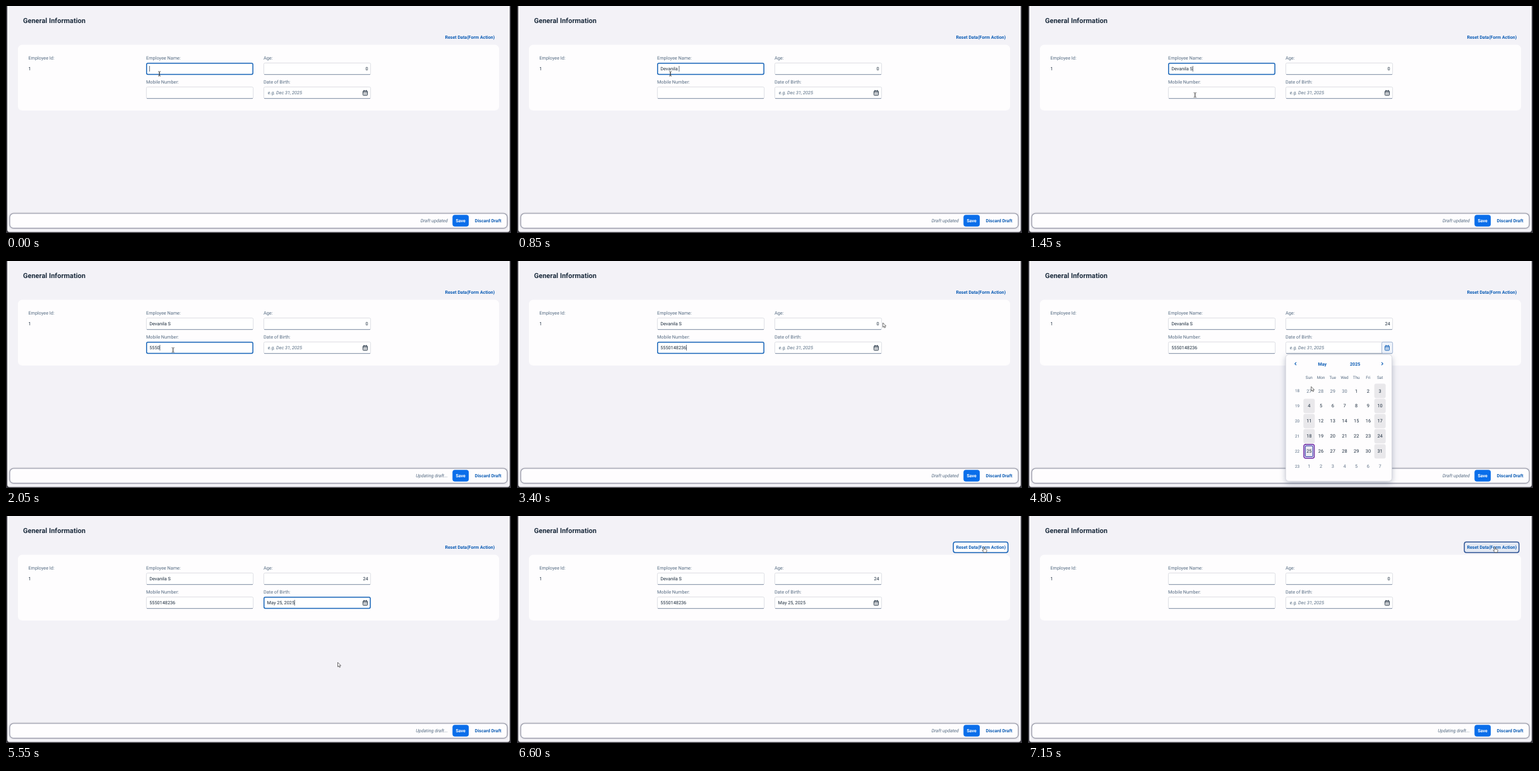
Recreate the animation shown at these times as an HTML page. Size 800 by 360 pixels, loop 7200 ms.

```html
<!DOCTYPE html>
<html lang="en">
<head>
<meta charset="utf-8">
<title>Employee form</title>
<style>
  html, body { margin: 0; width: 100%; height: 100%; overflow: hidden; background: #39383e; }
  svg { display: block; width: 100vw; height: 100vh; }
  text { font: 7.3px Roboto, "Open Sans", sans-serif; fill: #1d2d3e; white-space: pre; text-rendering: geometricPrecision; }
  .label { fill: #556b82; }
  .title { font-size: 11px; font-weight: 700; }
  .link { font-size: 7.1px; font-weight: 700; fill: #0b5cb5; }
  .hint { font-style: italic; fill: #556b82; }
  .mid { text-anchor: middle; }
  .end { text-anchor: end; }
  .small { font-size: 6.4px; fill: #556b82; }
  .day { font-size: 7.4px; }
  .out { fill: #66788c; }
</style>
</head>
<body>
<svg id="stage" viewBox="0 0 800 360" xmlns="http://www.w3.org/2000/svg"></svg>
<script>
const LOOP = 7200;
const NAME = "Devanila S";
const PHONE = "5550148236";
const BLUE = "#0b5cb5";
const stage = document.getElementById("stage");

function add(tag, attrs, parent = stage) {
  const el = document.createElementNS("http://www.w3.org/2000/svg", tag);
  for (const k in attrs) el.setAttribute(k, attrs[k]);
  parent.appendChild(el);
  return el;
}
function rect(x, y, width, height, rx, attrs, parent) {
  return add("rect", { x, y, width, height, rx, ...attrs }, parent);
}
function text(x, y, str, cls = "", parent) {
  const el = add("text", { x, y, class: cls }, parent);
  el.textContent = str;
  return el;
}
function path(d, attrs, parent) {
  return add("path", { d, fill: "none", ...attrs }, parent);
}
function show(el, on) { el.style.display = on ? "" : "none"; }
function put(el, str) { if (el.textContent !== str) el.textContent = str; }
const within = (v, a, b) => v >= a && v < b;

function field(x, y) {
  const plain = add("g", {});
  rect(x + .4, y + .4, 169.2, 18.4, 2, { fill: "#fff", stroke: "#d5d7de", "stroke-width": .8 }, plain);
  path(`M${x + 1} ${y + 18.6}h168`, { stroke: "#7d8ba3", "stroke-width": .9 }, plain);
  const ring = rect(x + .7, y + .7, 168.4, 17.8, 2.2, { fill: "#fff", stroke: "#1764b8", "stroke-width": 1.5 });
  return on => { show(plain, !on); show(ring, on); };
}

// Page
rect(2, -10, 796, 368.5, 4, { fill: "#f3f2f7" });
text(27, 27.4, "General Information", "title");
const button = rect(691.2, 41.3, 86.6, 16.6, 3.2, {});
text(695.5, 52.1, "Reset Data(Form Action)", "link");
rect(19, 61.5, 762, 104.2, 6.5, { fill: "#fefdfe" });

[[35.4, 85, "Employee Id:"], [222, 85, "Employee Name:"], [408, 85, "Age:"],
 [222, 123, "Mobile Number:"], [408, 123, "Date of Birth:"]]
  .forEach(([x, y, s]) => text(x, y, s, "label"));
text(35.4, 102.4, "1");

const focus = {
  name: field(222, 90), age: field(408, 90),
  phone: field(222, 128), date: field(408, 128)
};
const nameText = text(227.2, 102.4, "");
const phoneText = text(227.2, 140.2, "");
const ageText = text(573.6, 102.4, "0", "end");
const dateHint = text(414.8, 140.2, "e.g. Dec 31, 2025", "hint");
const dateText = text(413.6, 140.2, "May 25, 2025");
const iconBox = rect(560.4, 128.6, 17.2, 18, 2, { fill: "#eff3fa", stroke: "#8fa9cf", "stroke-width": .8 });
const icon = add("g", {});
rect(565.5, 134.6, 7, 7.2, 1, { fill: "none", "stroke-width": .9 }, icon);
path("M565.5 136.2h7M567.2 133.2v2M570.8 133.2v2", { "stroke-width": 1.1 }, icon);
path("M566.8 138.3h4.6M566.8 140.1h4.6", { "stroke-width": .9, "stroke-dasharray": "1 .8" }, icon);
const caret = path("", { stroke: "#1d2d3e", "stroke-width": .7 });

// Footer
rect(6, 329, 788, 23.4, 6, { fill: "#fefdfe", stroke: "#9698a9", "stroke-width": 1.1,
  style: "filter:drop-shadow(0 .5px 1.2px #5556)" });
const status = text(699.8, 343, "", "hint end");
rect(707.3, 331.2, 25.8, 18.6, 4, { fill: "#0a6eea" });
text(720.2, 343, "Save", "link mid").style.fill = "#fff";
text(742.8, 343, "Discard Draft", "link");

// Calendar
const cal = add("g", {});
rect(408.2, 148.4, 168.3, 200.8, 5, { fill: "#fefdfe", stroke: "#c9ccd6", "stroke-width": .6,
  style: "filter:drop-shadow(0 3px 5px #2235584d)" }, cal);
path("M425 160.7l-2.2 2.2 2.2 2.2M560 160.7l2.2 2.2-2.2 2.2", { stroke: BLUE, "stroke-width": 1.1 }, cal);
text(466.3, 165.6, "May", "link mid", cal);
text(518.2, 165.6, "2025", "link mid", cal);
"Sun Mon Tue Wed Thu Fri Sat".split(" ")
  .forEach((d, i) => text(445.3 + i * 18.72, 187.4, d, "small mid", cal));
for (let row = 0; row < 6; row++) {
  const y = 206 + row * 23.95;
  text(426.6, y + 2.2, 18 + row, "small mid", cal);
  for (let col = 0; col < 7; col++) {
    const n = row * 7 + col - 3;
    const inside = n >= 1 && n <= 31;
    const x = 445.3 + col * 18.72;
    if (inside && col % 6 === 0)
      rect(x - 9, y - 11.4, 18, 22.8, 3, { fill: "#e9e8eb" }, cal);
    if (n === 25) {
      rect(x - 8.2, y - 11, 16.4, 22, 3, { fill: "#fff", stroke: "#8a2fc4", "stroke-width": 1.5 }, cal);
      rect(x - 8.2, y - 11, 16.4, 22, 3, { fill: "none", stroke: "#24304f", "stroke-width": .8, "stroke-dasharray": "1 1" }, cal);
      rect(x - 6, y - 8.6, 12, 17.2, 1.5, { fill: "#ececf1", stroke: "#3c3fae", "stroke-width": 1.2 }, cal);
    }
    const label = n < 1 ? n + 30 : n > 31 ? n - 31 : n;
    text(x, y + 2.5, label, "day mid" + (inside ? "" : " out"), cal);
  }
}

// Pointers, each drawn around its hot spot
const pointers = { beam: add("g", {}), arrow: add("g", {}), hand: add("g", {}) };
path("M-2-3.5Q0-3.5 0-2.5V2.8Q0 3.8-2 3.8M2-3.5Q0-3.5 0-2.5V2.8Q0 3.8 2 3.8",
  { stroke: "#333", "stroke-width": .8 }, pointers.beam);
path("M0 0V7L1.6 5.6 2.7 8 4 7.4 2.9 5.1H5Z",
  { fill: "#fff", stroke: "#333", "stroke-width": .7, "stroke-linejoin": "round" }, pointers.arrow);
path("M-.8 0Q0-.9.8 0V3L4 3.7Q4.8 4 4.6 5L4 8.2H0L-2.5 5.2Q-2.4 4.2-.8 5Z",
  { fill: "#fff", stroke: "#333", "stroke-width": .7, "stroke-linejoin": "round" }, pointers.hand);

// time, x, y
const track = [
  [0, 243, 107.3], [1020, 243, 107.3], [1420, 264.6, 141], [2930, 264.6, 141],
  [3380, 579.6, 98], [3490, 579.6, 98], [3600, 558, 101], [4150, 558, 101],
  [4430, 569, 138], [4560, 569, 138], [4780, 448.6, 199.2], [4830, 448.6, 199.2],
  [5120, 446, 300], [5380, 446, 300], [5880, 739.6, 49.5], [LOOP, 739.6, 49.5]
];
function pointerAt(t) {
  let i = 1;
  while (i < track.length - 1 && t >= track[i][0]) i++;
  const [t0, x0, y0] = track[i - 1], [t1, x1, y1] = track[i];
  const p = (t - t0) / (t1 - t0), e = p * p * (3 - 2 * p);
  return [x0 + (x1 - x0) * e, y0 + (y1 - y0) * e];
}
function pointerKind(x, y, open) {
  if (x > 691 && within(y, 41, 58)) return "hand";
  const row = within(y, 90, 109) || within(y, 128, 147);
  if (!open && row && (within(x, 222, 391) || within(x, 408, y < 110 ? 578 : 560))) return "beam";
  return "arrow";
}

const RESET = 6850;
const saving = [[1550, 2300], [3650, 4150], [4550, 4750], [5450, 6050], [RESET, LOOP]];

function draw(t) {
  const cleared = t >= RESET;
  const open = within(t, 4600, 5400);
  const active = t < 1500 ? "name" : t < 3600 ? "phone" : t < 4500 ? "age" : within(t, 5400, 6550) ? "date" : "";
  for (const k in focus) focus[k](k === active);

  put(nameText, cleared ? "" : NAME.slice(0, Math.floor(t / 92)));
  put(phoneText, cleared || t < 1750 ? "" : PHONE.slice(0, 1 + Math.floor((t - 1750) / 100)));
  put(ageText, cleared || t < 3850 ? "0" : t < 4000 ? "2" : "24");
  const dated = within(t, 5400, RESET);
  show(dateText, dated);
  show(dateHint, !dated);
  show(iconBox, open);
  icon.setAttribute("stroke", open ? BLUE : "#1d2d3e");
  icon.setAttribute("fill", "none");
  show(cal, open);
  put(status, saving.some(([a, b]) => within(t, a, b)) ? "Updating draft..." : "Draft updated");

  let cx = 0, cy = 95;
  if (active === "name") cx = 227.4 + nameText.getComputedTextLength();
  if (active === "phone") { cx = 227.4 + phoneText.getComputedTextLength(); cy = 133; }
  if (active === "age") cx = 573.9;
  if (active === "date") { cx = 413.8 + dateText.getComputedTextLength(); cy = 133; }
  show(caret, cx > 0);
  caret.setAttribute("d", `M${cx} ${cy}v9`);

  const [x, y] = pointerAt(t);
  const kind = pointerKind(x, y, open);
  for (const k in pointers) show(pointers[k], k === kind);
  pointers[kind].setAttribute("transform", `translate(${x} ${y})`);

  const pressed = within(t, 6550, 6700);
  show(button, kind === "hand");
  button.setAttribute("fill", pressed ? "#fefdfe" : "#e4e9f3");
  button.setAttribute("stroke", pressed ? "#1764b8" : t < 6550 ? "#c3cede" : "#2f5596");
  button.setAttribute("stroke-width", t < 6550 ? .7 : 1.5);
}

const start = performance.now();
function tick(now) {
  draw(Math.max(0, now - start) % LOOP);
  requestAnimationFrame(tick);
}
draw(0);
requestAnimationFrame(tick);
</script>
</body>
</html>
```
